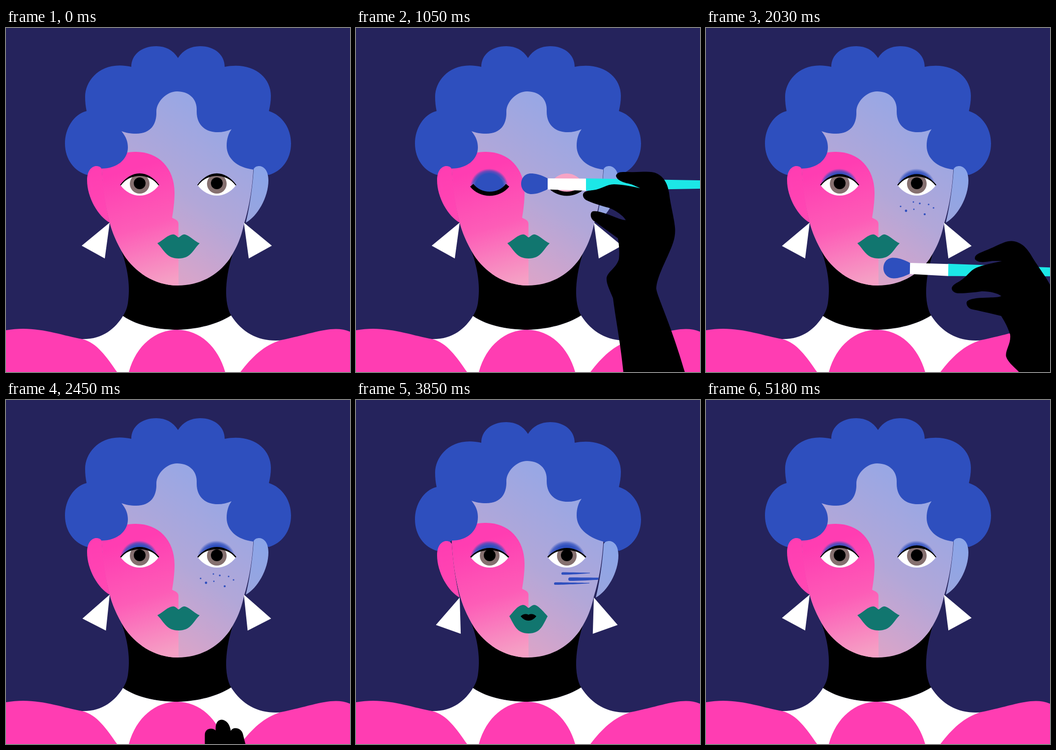
Animation of 700 by 700 pixels, one loop 5250 ms. Source, as an HTML page with a canvas:

```html
<!DOCTYPE html>
<html lang="en">
<head>
<meta charset="utf-8">
<title>Make-up portrait</title>
<style>
html, body { margin: 0; width: 100%; height: 100%; overflow: hidden; background: #25235c; }
canvas { display: block; width: 700px; height: 700px; }
</style>
</head>
<body>
<canvas id="stage" width="700" height="700"></canvas>
<script>
const ctx = document.getElementById('stage').getContext('2d');
const LOOP = 5250, STEP = 70;
const NAVY = '#25235c', BLUE = '#2e4fbe', PINK = '#ff3db2', TEAL = '#11766f', CYAN = '#1ce7e7';

// Eased value(s) at time t from rows of [time, value, ...]
function track(t, rows) {
  if (t <= rows[0][0]) return rows[0].slice(1);
  for (let i = 1; i < rows.length; i++) {
    const a = rows[i - 1], b = rows[i];
    if (t <= b[0]) {
      const k = (t - a[0]) / (b[0] - a[0]), e = k * k * (3 - 2 * k);
      return a.slice(1).map((v, j) => v + (b[j + 1] - v) * e);
    }
  }
  return rows[rows.length - 1].slice(1);
}

function fill(path, color) {
  ctx.fillStyle = color;
  ctx.fill(path instanceof Path2D ? path : new Path2D(path));
}

function gradient(x0, y0, x1, y1, ...colors) {
  const g = ctx.createLinearGradient(x0, y0, x1, y1);
  colors.forEach((c, i) => g.addColorStop(i / (colors.length - 1), c));
  return g;
}

function disc(x, y, r, color) {
  ctx.fillStyle = color;
  ctx.beginPath();
  ctx.arc(x, y, r, 0, Math.PI * 2);
  ctx.fill();
}

function group(draw) {
  ctx.save();
  draw();
  ctx.restore();
}

function spin(x, y, deg) {
  ctx.translate(x, y);
  ctx.rotate(deg * Math.PI / 180);
  ctx.translate(-x, -y);
}

const neck = new Path2D('M230 440C250 490 253 530 248 560C246 572 242 580 238 586C270 608 315 614 350 614C390 613 430 603 458 585C444 560 443 510 466 445Z');
const collar = new Path2D('M238 586C222 612 195 635 152 633L200 700H510L566 635C520 640 484 625 458 585C430 603 390 613 350 614C315 614 270 608 238 586Z');
const dress = new Path2D('M0 615C60 604 110 625 155 633C185 640 205 670 226 700H0Z M250 700C265 645 305 614 348 614C395 614 432 650 446 700Z M700 618C665 603 625 622 560 635C525 645 500 670 477 700H700Z');
const face = new Path2D('M195 270L230 195C230 85 465 85 465 195L504 270C503 320 495 365 484 400C476 437 464 455 455 470C430 505 392 524 350 524C300 524 262 495 240 462C225 437 216 415 211 396C203 365 197 330 195 287Z');
const ear = new Path2D('M165 310C165 288 176 281 184 281C189 281 193 283 195 287C197 320 203 365 211 396C188 384 165 345 165 310Z');
const bristles = new Path2D('M390 306C375 298 364 296 356 296C343 296 336 306 336 317C336 329 345 338 357 338C368 338 378 334 390 328Z');
const brushHand = new Path2D('M529 301C531 292 540 293 555 293C580 294 600 290 612 296C628 304 634 318 637 335C640 360 648 390 649 405C651 425 645 440 636 460C625 485 612 510 611 530C612 545 640 600 669 700L780 1100H600L544 700C538 640 528 590 523 550C515 530 509 520 510 508C513 495 530 488 535 470C537 450 534 435 533 428C515 415 495 400 483 392C476 386 476 375 482 373C492 371 510 378 525 384C535 388 543 391 549 391C545 383 530 372 515 366C500 362 480 356 468 350C461 345 461 339 463 336C467 331 474 331 482 330C500 328 510 318 525 318C540 318 560 322 578 326C574 324 568 321 560 318C548 315 532 312 529 301Z');
const openHand = new Path2D('M382 520C381 480 381 440 384 420C384 405 392 403 397 406C405 409 405 420 406 430C408 445 408 462 411 467C415 460 411 420 411 400V360C411 345 428 345 433 351C432 335 438 329 446 329C457 331 462 340 464 352C467 343 486 344 489 360C495 385 505 420 512 450C518 475 526 505 527 525C527 560 526 590 527 620C528 650 533 675 539 700L580 950H440L420 700C418 660 414 625 401 608C388 585 382 560 382 520Z');
const puffHand = new Path2D('M198 700C215 655 235 610 247 590C255 560 275 535 295 510C305 492 325 470 342 450C360 422 380 397 392 390C408 381 425 390 417 408C405 434 374 458 366 483C376 480 382 468 390 459C405 440 425 410 436 396C448 380 470 382 470 397V411C480 413 481 424 477 434C470 451 453 471 446 486C450 485 452 479 460 477C470 475 473 484 470 494C465 515 453 528 447 545C446 575 428 587 405 607C388 632 374 645 352 655C338 668 330 685 322 700L250 950H110Z');

function hair(p) {
  const o = 8 * p, i = -5 * p;
  // outer outline drops while the inner hairline lifts
  const shape = [
    [o, 'M', 350, 61],
    [o, 'C', 360, 45, 376, 37, 395, 37], [o, 'C', 425, 37, 445, 55, 445, 79],
    [o, 'C', 500, 68, 539, 98, 539, 138], [o, 'C', 539, 150, 537, 160, 535, 169],
    [o, 'C', 563, 178, 580, 205, 580, 235], [o, 'C', 580, 268, 560, 292, 535, 299],
    [0, 'L', 503, 288],
    [i, 'C', 470, 284, 449, 265, 449, 240], [i, 'C', 449, 225, 453, 214, 459, 206],
    [i, 'C', 430, 219, 388, 213, 388, 170], [i, 'C', 390, 143, 371, 129, 348, 129],
    [i, 'C', 327, 129, 306, 150, 306, 170], [i, 'C', 307, 195, 295, 215, 265, 215],
    [i, 'C', 253, 215, 243, 213, 235, 210], [i, 'C', 245, 222, 248, 232, 248, 243]
  ].map(([d, cmd, ...n]) => cmd + n.map((v, k) => k % 2 ? v + d : v).join(' ')).join('');
  const left = [161, 105, 195, 65, 255, 79];
  fill(shape + `C248 268 225 286 195 286L165 ${299 + o}` +
    `C140 ${292 + o} 120 ${268 + o} 120 ${235 + o}C120 ${205 + o} 137 ${176 + o} 164 ${169 + o}` +
    `C162 ${160 + o} 161 ${150 + o} 161 ${140 + o}` +
    'C' + left.map((v, k) => k % 2 ? v + o : v).join(' ') +
    `C255 ${55 + o} 275 ${37 + o} 306 ${37 + o}C325 ${37 + o} 340 ${45 + o} 350 ${61 + o}Z`, BLUE);
}

function drawFace(p) {
  group(() => {
    ctx.clip(face);
    fill('M150 100H550V530H150Z', gradient(500, 240, 315, 500, '#99a7e4', '#b2a7d8', '#dda4c8'));
    ctx.translate(0, -2 * p);
    fill('M150 305C200 262 235 252 265 252C310 252 343 285 343 335C343 355 340 375 338 386C345 390 351 391 351 399V540H150Z',
      gradient(245, 290, 315, 520, PINK, '#fd5db7', '#f5a0c5'));
  });
}

function ears(p) {
  group(() => {
    ctx.translate(0, 6 * p);
    fill(ear, gradient(170, 290, 205, 390, PINK, '#ff48b3'));
    ctx.translate(699, 0);
    ctx.scale(-1, 1);
    fill(ear, gradient(165, 300, 215, 390, '#8ba5e8', '#9aa5de'));
  });
}

function earrings(p, angle) {
  for (const side of [1, -1]) group(() => {
    ctx.translate(side > 0 ? 211 : 484, 396 + 6 * p);
    ctx.scale(side, 1);
    ctx.rotate(-angle * Math.PI / 180);
    fill('M0 0L-57 47L-10 73Z', '#fff');
  });
}

function eye(x, shut, shade, lidColor) {
  const hw = 39 - 2.5 * shut, l = x - hw, r = x + hw;
  const y = 291 + 52 * shut;
  const arc = v => `C${x - 18} ${v} ${x + 18} ${v} ${r} 320`;
  const back = v => `C${x + 18} ${v} ${x - 18} ${v} ${l} 320`;
  if (shut > 0.01) fill(`M${l} 320${arc(288)}${back(y)}Z`, lidColor);
  if (shade > 0) group(() => {
    ctx.clip(new Path2D(`M${x - 60} 320H${l}${arc(y)}H${x + 60}V270H${x - 60}Z`));
    ctx.globalAlpha = shade;
    ctx.translate(x - 1, 323);
    ctx.scale(1.05, 1);
    const g = ctx.createRadialGradient(0, 0, 0, 0, 0, 37);
    g.addColorStop(0.72, BLUE);
    g.addColorStop(0.86, 'rgba(46,79,190,.72)');
    g.addColorStop(1, 'rgba(46,79,190,0)');
    disc(0, 0, 37, g);
  });
  if (shut < 0.95) group(() => {
    const white = new Path2D(`M${l} 320${arc(y)}${back(348)}Z`);
    fill(white, '#fff');
    ctx.clip(white);
    disc(x, 317, 20, '#85706f');
    disc(x, 316, 12, '#000');
  });
  const d = 3.5 * (1 - shut);
  const lash = new Path2D(`M${l} 320${arc(y - d)}${back(y + d)}Z`);
  fill(lash, '#000');
  ctx.strokeStyle = '#000';
  ctx.lineWidth = 2 + 6.5 * shut;
  ctx.stroke(new Path2D(`M${l} 320${arc(y)}`));
}

function lips(p) {
  const a = 308 + 4 * p, b = 394 - 4 * p, m = 438 + 2 * p, u = 420 - 3 * p, n = 426 - 3 * p, d = 469 + 6 * p;
  fill(`M${a} ${m}C320 432 328 ${u + 1} 340 ${u}C346 ${u} 349 ${n} 351 ${n}C354 ${n} 357 ${u} 363 ${u}` +
    `C372 ${u + 1} 385 435 ${b} ${m}C380 ${452 + 6 * p} 376 ${d} 351 ${d}C327 ${d} 322 ${452 + 6 * p} ${a} ${m}Z`, TEAL);
  if (p > 0.02) group(() => {
    ctx.translate(351, 441);
    ctx.scale(p, p);
    fill('M-16 -1Q-8 -8 0 -4Q8 -8 16 -1Q9 8 0 8Q-9 8 -16 -1Z', '#000');
  });
}

const spots = [[396, 363, 1.6], [407, 372, 2.4], [422, 354, 1.5], [423, 369, 1.4],
  [435, 357, 1.8], [445, 379, 2.1], [453, 359, 1.6], [463, 366, 1.6]];

function freckles(t) {
  if (t > 2.88) return;
  spots.forEach(([x, y, r], i) => { if (t > 1.66 + i * 0.035) disc(x, y, r, BLUE); });
}

function smears(q) {
  if (q <= 0) return;
  group(() => {
    ctx.clip(face);
    for (const [x, y, len, r, tip] of [[418, 353, 58, 2.6, 0.6], [432, 364.5, 64, 3.5, 2], [403, 373.5, 72, 2.6, 0.6]]) {
      const e = x + Math.max(7, len * q);
      fill(`M${x + r} ${y - r}C${x + 20 * q} ${y - r} ${e - 15 * q} ${y - 1 - tip} ${e} ${y - 1 - tip}V${y - 1 + tip}` +
        `C${e - 15 * q} ${y + tip} ${x + 20 * q} ${y + r} ${x + r} ${y + r}A${r} ${r} 0 0 1 ${x + r} ${y - r}Z`, BLUE);
    }
  });
}

function brush(t) {
  if (t > 2.26) return;
  const [x, y, turn] = track(t, [
    [0, 40, 800, 0], [0.28, 46, 470, 0], [0.5, 236, 322, 0], [0.63, 262, 314, 0],
    [0.77, 240, 319, 0], [0.91, 272, 312, 0], [1.05, 336, 317, 0], [1.19, 398, 311, 0],
    [1.33, 428, 317, 0], [1.47, 400, 309, 0], [1.61, 404, 318, -2], [1.75, 398, 362, -8],
    [1.82, 422, 352, -10], [1.89, 446, 366, -14], [2.03, 361, 488, -23], [2.24, 430, 860, -28]]);
  group(() => {
    ctx.translate(x - 336, y - 317);
    group(() => {
      spin(336, 317, -turn * 0.05);
      fill('M467 306L762 311V326L467 331Z', CYAN);
      fill('M390 306L468 306.5V331L389 328.5Z', '#fff');
      fill(bristles, BLUE);
    });
    spin(529, 300, turn);
    if (turn < -20) ctx.translate(-6, -4);
    fill(brushHand, '#000');
  });
}

function wipe(t) {
  if (t < 2.3 || t > 3.8) return;
  const [x, y] = track(t, [[2.31, -8, 400], [2.8, 0, 4], [2.94, 0, 0], [3.29, 88, 6], [3.45, 95, 60], [3.75, 60, 420]]);
  group(() => { ctx.translate(x, y); fill(openHand, '#000'); });
}

function puff(t) {
  if (t < 3.95) return;
  const [x, y] = track(t, [[3.98, -60, 400], [4.34, -8, 6], [4.48, 0, 0], [4.6, -14, 10],
    [4.72, 6, -4], [4.84, -6, 12], [5.11, -70, 400]]);
  group(() => {
    ctx.translate(x, y);
    disc(442, 406, 80, '#fff');
    fill(puffHand, '#000');
  });
}

function draw(t) {
  const [p] = track(t, [[2.9, 0], [3.4, 0.6], [3.8, 1], [4, 1], [4.3, 0]]);
  const [sway] = track(t, [[1.7, 0], [2.03, 0.6], [2.66, 2.2], [2.94, 4.7], [3.85, 9.5], [4.48, 7], [5.04, 2], [5.18, 0.6]]);
  const [shut] = track(t, [[0.08, 0], [0.35, 1], [1.53, 1], [1.72, 0], [2.03, 0.04], [2.94, 0.13], [3.95, 0.13], [4.2, 1], [4.8, 1], [5.02, 0]]);
  const [leftShade, rightShade] = track(t, [[0.6, 0, 0], [0.95, 1, 0], [1.2, 1, 0], [1.55, 1, 1]]);
  const [mouth] = track(t, [[3.1, 0], [3.7, 1], [4, 1], [4.25, 0]]);
  const [drag] = track(t, [[2.85, 0], [2.94, 0.1], [3.29, 1]]);

  ctx.fillStyle = NAVY;
  ctx.fillRect(0, 0, 700, 700);
  fill(neck, '#000');
  fill(collar, '#fff');
  fill(dress, PINK);
  drawFace(p);
  hair(p);
  ears(p);
  earrings(p, sway);
  eye(272, shut, leftShade, '#fb8fc4');
  eye(429, shut, rightShade, '#f6a4c5');
  lips(mouth);
  freckles(t);
  if (t < 4.45) smears(drag);
  brush(t);
  wipe(t);
  puff(t);
}

const start = performance.now();
function tick(now) {
  const ms = Math.max(0, now - start) % LOOP;
  draw(Math.floor(ms / STEP) * STEP / 1000);
  requestAnimationFrame(tick);
}
draw(0);
requestAnimationFrame(tick);
</script>
</body>
</html>
```
